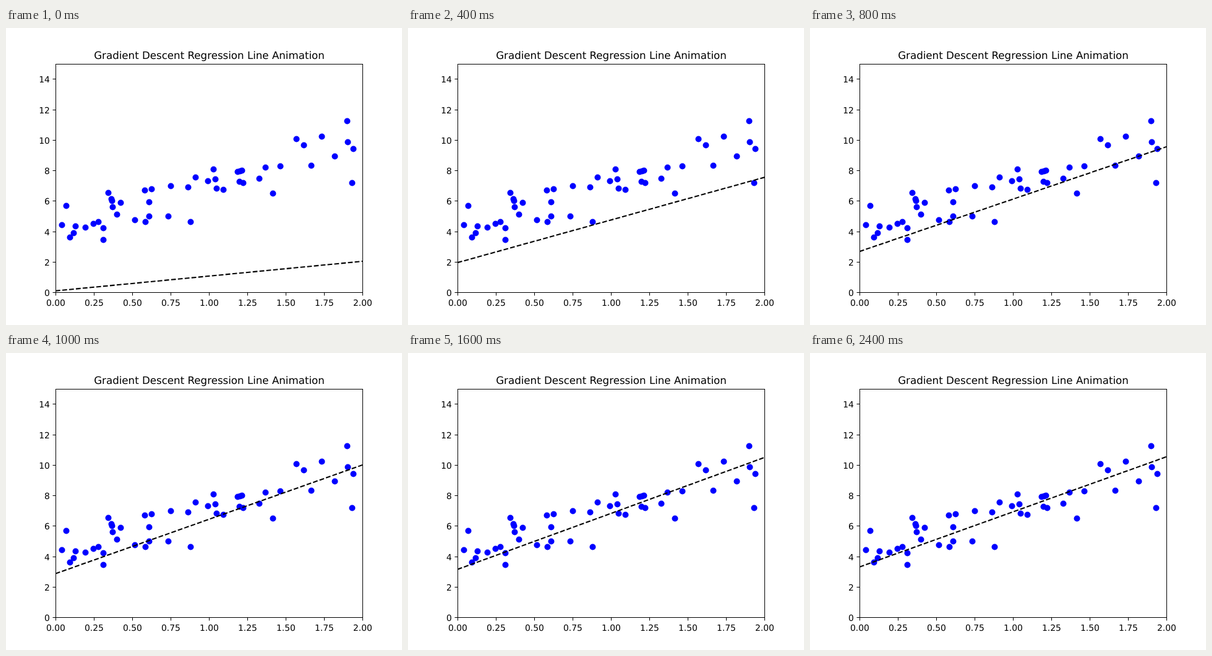
An HTML page for the animation above (2.6 s loop, 640 px wide and 480 px high).

```html
<!DOCTYPE html>
<html lang="en">
<head>
<meta charset="utf-8">
<title>Gradient descent</title>
<style>
html, body { margin: 0; width: 100%; height: 100%; overflow: hidden; background: #fff; }
svg { display: block; width: 640px; height: 480px; }
text { font: 13.889px "DejaVu Sans", sans-serif; text-rendering: geometricPrecision; }
.title { font-size: 16.667px; }
.mid { text-anchor: middle; }
.end { text-anchor: end; }
.axis { fill: none; stroke: #000; }
</style>
</head>
<body>
<svg viewBox="0 0 640 480">
  <clipPath id="plot"><rect x="80" y="58" width="496" height="369"/></clipPath>
  <g id="dots" fill="#00f"></g>
  <line id="fit" clip-path="url(#plot)" stroke="#000" stroke-width="2.083" stroke-dasharray="7.708 3.333"/>
  <rect class="axis" x="80.5" y="58.5" width="496" height="369"/>
  <path id="ticks" class="axis"/>
  <g id="labels"><text class="title mid" x="328.5" y="50">Gradient Descent Regression Line Animation</text></g>
</svg>
<script>
const STEP = 200, FRAMES = 13, COUNT = 50, RATE = 0.1;
const $ = id => document.getElementById(id);
const px = x => 80 + 248 * x;
const py = y => 427.2 - 24.64 * y;
const snap = v => Math.round(v) + 0.5;

function add(parent, tag, attrs, text = '') {
  const el = document.createElementNS('http://www.w3.org/2000/svg', tag);
  for (const key in attrs) el.setAttribute(key, attrs[key]);
  el.textContent = text;
  parent.append(el);
}

// Mersenne Twister (MT19937), uniform in [0, 1) with 53 bits
function twister(seed) {
  const N = 624, s = new Uint32Array(N);
  s[0] = seed;
  for (let j = 1; j < N; j++)
    s[j] = Math.imul(1812433253, s[j - 1] ^ (s[j - 1] >>> 30)) + j;
  let i = 0;
  function next() {
    const mix = (s[i] & 0x80000000) | (s[(i + 1) % N] & 0x7fffffff);
    s[i] = s[(i + 397) % N] ^ (mix >>> 1) ^ (mix & 1 ? 0x9908b0df : 0);
    let y = s[i];
    i = (i + 1) % N;
    y ^= y >>> 11;
    y ^= (y << 7) & 0x9d2c5680;
    y ^= (y << 15) & 0xefc60000;
    return (y ^ (y >>> 18)) >>> 0;
  }
  return () => {
    const high = next() >>> 5, low = next() >>> 6;
    return (high * 2 ** 26 + low) / 2 ** 53;
  };
}

const random = twister(42);

// Two normal deviates by the polar method
function normalPair() {
  let a, b, r;
  do {
    a = 2 * random() - 1;
    b = 2 * random() - 1;
    r = a * a + b * b;
  } while (r >= 1 || r === 0);
  const f = Math.sqrt(-2 * Math.log(r) / r);
  return [f * b, f * a];
}

// Samples of y = 4 + 3x + noise
const xs = Array.from({ length: COUNT }, () => 2 * random());
const noise = Array.from({ length: COUNT / 2 }, normalPair).flat();
const points = xs.map((x, i) => ({ x, y: 4 + 3 * x + noise[i] }));

for (const { x, y } of points)
  add($('dots'), 'circle', { cx: snap(px(x)), cy: snap(py(y)), r: 5 });

let ticks = '';
for (let x = 0; x <= 2; x += 0.25) {
  ticks += `M${snap(px(x))} 427.5v5`;
  add($('labels'), 'text', { class: 'mid', x: px(x) + 0.5, y: 449 }, x.toFixed(2));
}
for (let y = 0; y <= 14; y += 2) {
  const row = snap(py(y));
  ticks += `M80.5 ${row}h-5`;
  add($('labels'), 'text', { class: 'end', x: 70.8, y: row + 5.5 }, y);
}
$('ticks').setAttribute('d', ticks);

// One [intercept, slope] pair per gradient descent step
const fits = [normalPair()];
while (fits.length < FRAMES) {
  const [a, b] = fits.at(-1);
  let da = 0, db = 0;
  for (const { x, y } of points) {
    const error = a + b * x - y;
    da += error;
    db += error * x;
  }
  const k = 2 * RATE / COUNT;
  fits.push([a - k * da, b - k * db]);
}

function draw(time) {
  const [a, b] = fits[Math.floor(time / STEP) % FRAMES];
  const ends = { x1: px(0), y1: py(a), x2: px(2), y2: py(a + 2 * b) };
  for (const key in ends) $('fit').setAttribute(key, ends[key]);
}

function tick() {
  draw(performance.now());
  requestAnimationFrame(tick);
}
tick();
</script>
</body>
</html>
```
